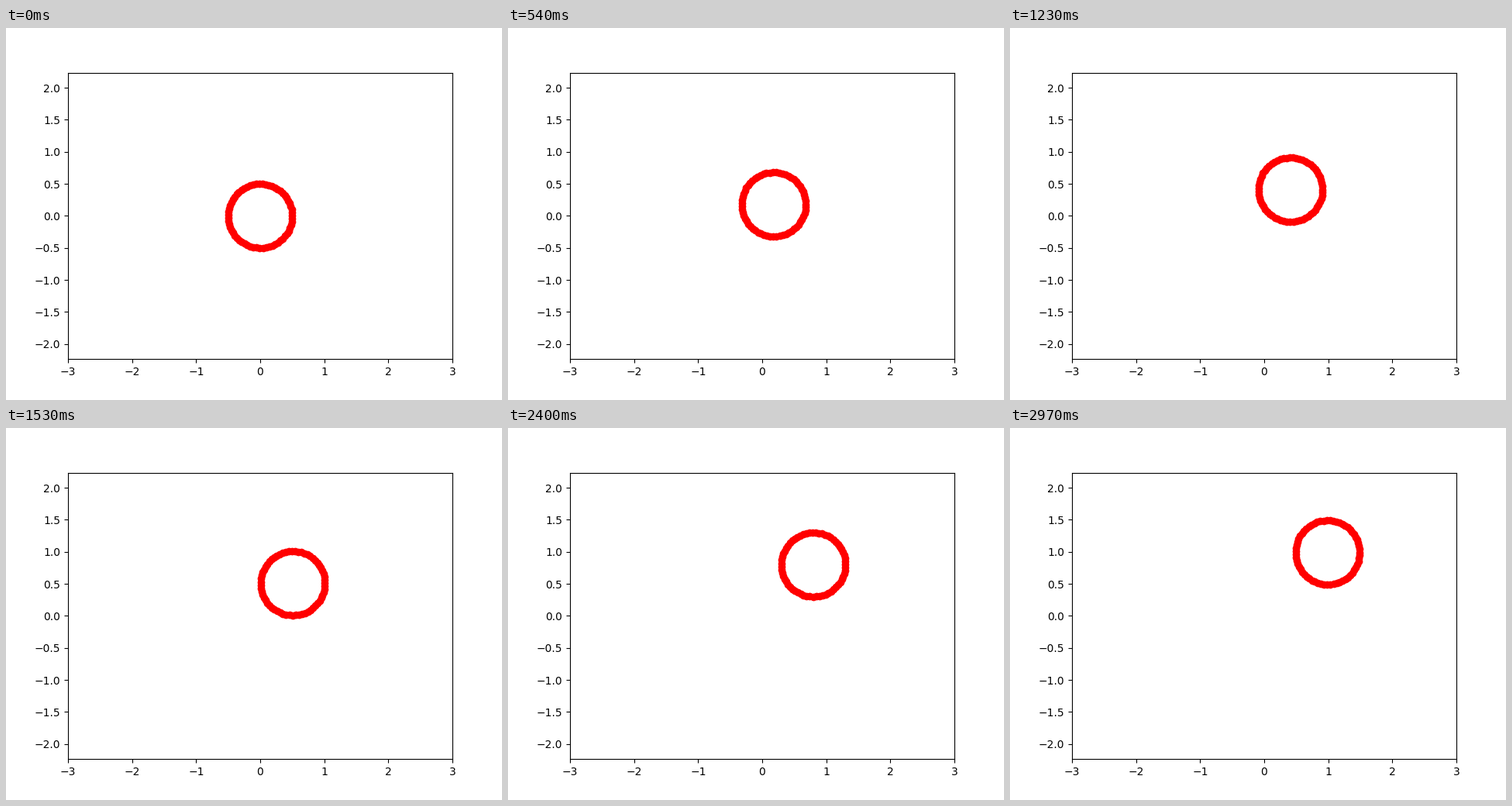
A matplotlib script that plays this animation: 640 by 480 pixels, repeating every 3 s.

```python
import numpy as np
import matplotlib.pyplot as plt
from matplotlib.animation import FuncAnimation

FRAMES = 100
INTERVAL = 30
RADIUS = 0.5
STEP = 0.01

angles = np.arange(0, 2 * np.pi, 0.1)
ring_x = RADIUS * np.cos(angles)
ring_y = RADIUS * np.sin(angles)

fig, ax = plt.subplots(figsize=(6.4, 4.8), dpi=100)

# Equal scale on both axes
box = ax.get_position()
half_height = 3 * (box.height * 4.8) / (box.width * 6.4)
ax.set_xlim(-3, 3)
ax.set_ylim(-half_height, half_height)

dots, = ax.plot([], [], "ro")


def update(i):
    shift = i * STEP
    dots.set_data(ring_x + shift, ring_y + shift)
    return dots,


anim = FuncAnimation(fig, update, frames=FRAMES, interval=INTERVAL,
                     repeat=True, repeat_delay=0)
plt.show()
```
